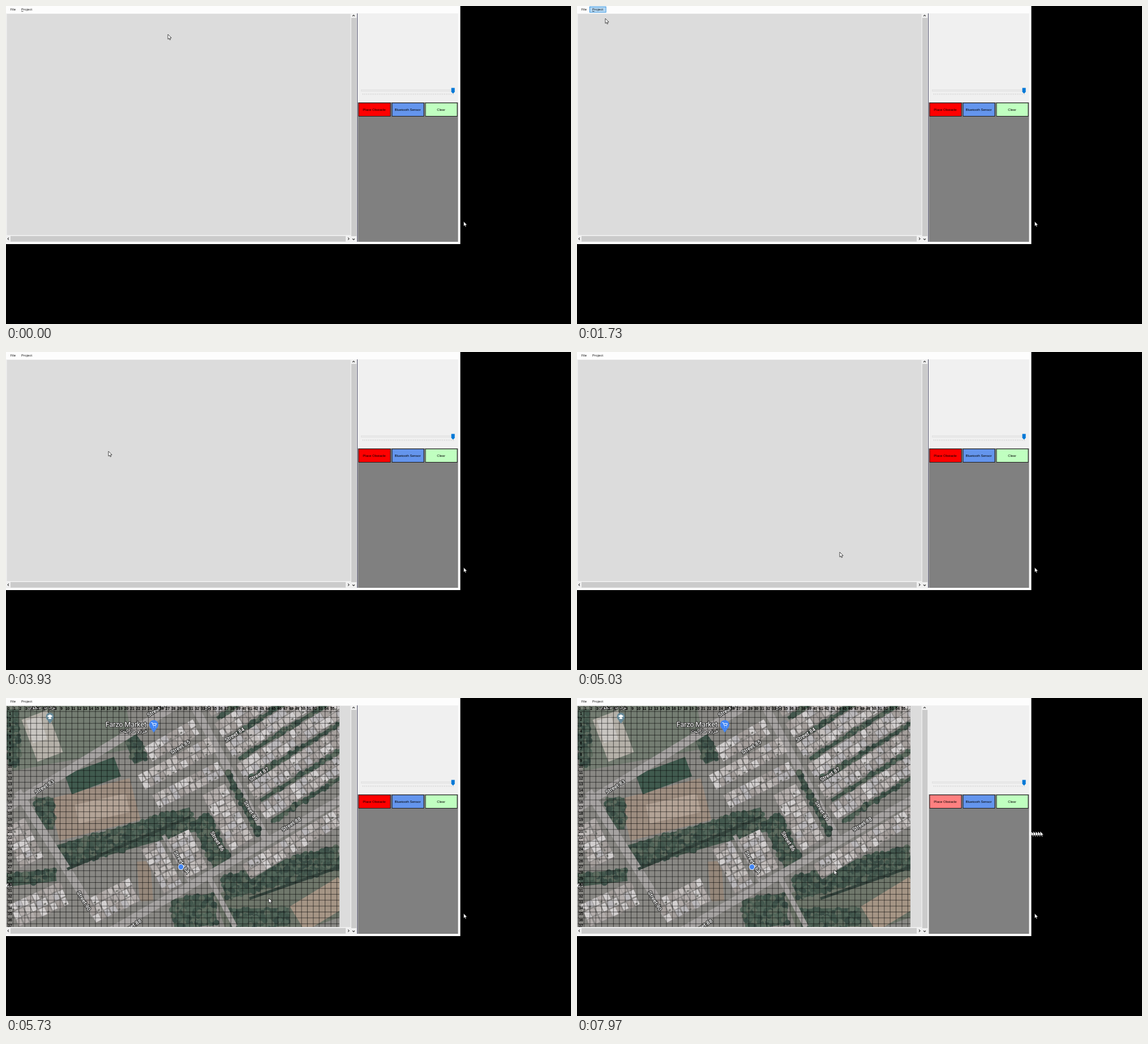
Recreate the animation shown at these times as an HTML page with a canvas. Size 998 by 561 pixels, loop 8000 ms.

```html
<!DOCTYPE html>
<html lang="en">
<head>
<meta charset="utf-8">
<title>Obstacle map editor</title>
<style>
html, body { margin: 0; width: 100%; height: 100%; overflow: hidden; background: #000; }
canvas { display: block; }
</style>
</head>
<body>
<canvas id="stage" width="998" height="561"></canvas>
<script>
const W = 998, H = 561, LOOP = 8000;
const MAP_AT = 5070, MENU_ON = 700, MENU_OFF = 2240, HOVER_AT = 6270, PRESS_AT = 7200;
const ctx = document.getElementById('stage').getContext('2d');
const UI = '6px "Open Sans", "Noto Sans", sans-serif';
const SANS = '"Liberation Sans", Arial, sans-serif';
const CELL = 10.4, LEFT = 2, TOP = 13.5;

// Pointer moves: start, end, target x, target y
const moves = [
  [30, 230, 134, 27], [430, 830, 43, 5], [1430, 1730, 50, 22],
  [2230, 2770, 227, 125], [2770, 3030, 197, 180], [3070, 3230, 168, 167],
  [3830, 4630, 464, 353], [5900, 6270, 640, 184], [6270, 6630, 802, 235],
  [6630, 6850, 818, 235], [6920, 7200, 648, 183], [7230, 7530, 584, 270],
  [7600, 7970, 454, 303]
];

function pointer(t) {
  let x = 286, y = 50;
  for (const [from, to, tx, ty] of moves) {
    const k = Math.min(1, Math.max(0, (t - from) / (to - from)));
    const e = k * k * (3 - 2 * k);
    x += (tx - x) * e;
    y += (ty - y) * e;
  }
  return [x, y];
}

function random(seed) {
  return () => (seed = (seed * 16807) % 2147483647) / 2147483647;
}

function rect(c, color, x, y, w, h) {
  c.fillStyle = color;
  c.fillRect(x, y, w, h);
}

function disc(c, color, x, y, r) {
  c.fillStyle = color;
  c.beginPath();
  c.arc(x, y, r, 0, 7);
  c.fill();
}

function text(c, str, x, y, font, align = 'left') {
  c.font = font;
  c.fillStyle = '#000';
  c.textAlign = align;
  c.textBaseline = 'middle';
  c.fillText(str, x, y);
}

function drawMap() {
  const layer = document.createElement('canvas');
  layer.width = 589;
  layer.height = 404;
  const m = layer.getContext('2d');
  const rnd = random(4127);
  const pick = list => list[Math.floor(rnd() * list.length)];
  m.beginPath();
  m.rect(1, 14, 588, 390);
  m.clip();

  // Everything on the ground is a straight band of some width
  const band = (color, width, x1, y1, x2, y2, fill) => {
    const len = Math.hypot(x2 - x1, y2 - y1);
    m.save();
    m.translate(x1, y1);
    m.rotate(Math.atan2(y2 - y1, x2 - x1));
    rect(m, color, 0, -width / 2, len, width);
    if (fill) fill(len, width);
    m.restore();
  };
  const houses = (...place) => band('#8d8a88', ...place, (len, width) => {
    const rows = Math.round(width / 15), depth = width / rows;
    for (let r = 0; r < rows; r++) {
      for (let u = 0; u < len - 5; u += 11) {
        const v = r * depth - width / 2;
        rect(m, pick(['#c4bfbd', '#b3adab', '#d2cfcf', '#a59f9c', '#bab8bb']), u, v, 8 + rnd() * 3, depth - 1 - rnd() * 2);
        if (rnd() < .35) rect(m, '#7a7a75', u + 1, v + depth * .6, 4, 3);
      }
    }
  });
  const trees = (...place) => band('#485b50', ...place, (len, width) => {
    for (let i = 0; i < len * width / 28; i++) {
      disc(m, pick(['#3b4e47', '#52665a', '#42574d', '#5f6d60']), rnd() * len, (rnd() - .5) * width, 2 + rnd() * 4);
    }
  });
  const road = (...place) => band('#a6a3a2', ...place);

  rect(m, '#898884', 0, 0, 589, 404);

  // Open ground
  band('#747d72', 120, 0, 70, 215, 30);
  band('#b5b1a9', 48, 50, 30, 78, 104);
  band('#c8c5c1', 26, 48, 36, 60, 76);
  band('#9d8d80', 76, 85, 215, 228, 178);
  band('#b3a396', 34, 125, 205, 215, 185);
  band('#6f776b', 110, 385, 400, 600, 325);
  band('#a59585', 52, 515, 390, 600, 338);
  band('#95877a', 24, 243, 288, 248, 358);

  // Greenery
  band('#405a4e', 36, 110, 153, 197, 121);
  trees(42, 95, 280, 330, 213);
  trees(34, 342, 212, 384, 296);
  trees(40, 385, 336, 589, 280);
  trees(32, 68, 176, 68, 232);
  trees(22, 0, 322, 88, 312);
  trees(76, 328, 350, 336, 404);
  trees(32, 395, 388, 500, 386);
  trees(20, 12, 20, 14, 120);
  trees(24, 214, 55, 238, 112);

  // Roads
  road(15, 0, 195, 320, 0);
  road(15, 20, 165, 160, 385);
  road(14, 180, 414, 600, 174);
  road(14, 332, 14, 462, 252);
  road(9, 355, 310, 405, 404);
  road(7, 278, 242, 326, 326);

  // Blocks of houses, north-east terraces first
  for (let i = -1; i < 5; i++) {
    const x = 376 + 19.2 * i, y = 58 + 36.3 * i;
    houses(30, x, y, x + 260, y - 163);
    trees(6, x + 16, y + 14, x + 276, y - 149);
  }
  houses(30, 252, 100, 335, 52);
  houses(30, 240, 150, 362, 84);
  houses(28, 265, 184, 378, 126);
  houses(46, 366, 162, 418, 262);
  houses(30, 425, 307, 600, 203);
  houses(38, 255, 260, 296, 340);
  houses(42, 304, 241, 338, 310);
  houses(46, 12, 222, 48, 295);
  houses(46, 150, 378, 228, 338);
  houses(44, 15, 385, 100, 346);
  trees(9, 390, 130, 446, 240);

  // Canal
  band('#36463f', 5, 108, 302, 325, 210);
  band('#36463f', 5, 430, 354, 589, 298);

  const label = (str, x, y, angle, font = '500 9.6px Roboto') => {
    m.save();
    m.translate(x, y);
    m.rotate(angle);
    m.font = `${font}, "Noto Sans", "DejaVu Sans", sans-serif`;
    m.textAlign = 'center';
    m.textBaseline = 'middle';
    m.lineJoin = 'round';
    m.lineWidth = 2.2;
    m.strokeStyle = '#30302f';
    m.strokeText(str, 0, 0);
    m.fillStyle = '#fff';
    m.fillText(str, 0, 0);
    m.restore();
  };
  const pin = (color, x, y, r) => {
    disc(m, color, x, y, r);
    m.beginPath();
    m.moveTo(x - r * .85, y + r * .5);
    m.lineTo(x + r * .85, y + r * .5);
    m.lineTo(x, y + r * 1.75);
    m.fill();
  };

  // Grid
  m.strokeStyle = 'rgba(0,0,0,.8)';
  m.lineWidth = .7;
  m.beginPath();
  for (let x = LEFT; x < 589; x += CELL) { m.moveTo(x, 14); m.lineTo(x, 404); }
  for (let y = TOP; y < 404; y += CELL) { m.moveTo(1, y); m.lineTo(589, y); }
  m.stroke();

  const along = -.56, across = 1.03;
  label('Street 83', 68, 157, along);
  label('Street 84', 404, 65, along);
  label('Street 85', 308, 87, along);
  label('Street 87', 447, 135, along);
  label('Street 88', 504, 223, along);
  label('Street 88', 222, 403, along);
  label('Street 85', 267, 21, along);
  label('Street 89', 432, 199, across);
  label('Street 86', 373, 253, across);
  label('Street 86A', 310, 290, across);
  label('Street 90', 137, 358, across);
  label('61', 6, 331, 0);
  label('St', 356, 18, 0);
  label('Farzo Market', 212, 47, 0, '400 12.4px Roboto');
  label('فرزو مارکیٹ', 225, 59, 0, '9px "DejaVu Sans"');
  label('بزم نو سکول', 68, 17, 0, '9px "DejaVu Sans"');

  pin('#4285f4', 261, 47, 8);
  m.strokeStyle = '#fff';
  m.lineWidth = 1;
  m.stroke(new Path2D('M256.5 43.5h2l1.5 5h4.5l1-3.5h-6M260 51h1M264 51h1'));
  pin('#668897', 77.5, 33, 7);
  m.fillStyle = '#fff';
  m.fill(new Path2D('M72.5 32l5-3l5 3l-5 3zM75 35h5v2h-5z'));

  disc(m, '#dce8fb', 309, 298, 5.2);
  disc(m, '#4285f4', 309, 298, 4.2);

  const num = `bold 6.6px ${SANS}`;
  for (let n = 0; n < 56; n++) text(m, n, 4.6 + CELL * n, 19, num, 'center');
  for (let n = 1; n < 38; n++) text(m, n, 7, 17.3 + CELL * n, num, 'center');
  return layer;
}

const arrow = new Path2D('M0 0V8.6L2 6.9L3.2 9.8L4.7 9.2L3.5 6.4L6.2 6.2Z');

function cursor(x, y) {
  ctx.save();
  ctx.translate(x, y);
  ctx.fillStyle = '#fff';
  ctx.fill(arrow);
  ctx.strokeStyle = '#111';
  ctx.lineWidth = .75;
  ctx.stroke(arrow);
  ctx.restore();
}

function chevron(x, y, dx, dy) {
  ctx.strokeStyle = '#404040';
  ctx.lineWidth = 1.1;
  ctx.beginPath();
  ctx.moveTo(x - dx - dy * 2, y - dy - dx * 2);
  ctx.lineTo(x + dx, y + dy);
  ctx.lineTo(x - dx + dy * 2, y - dy + dx * 2);
  ctx.stroke();
}

function button(label, i, color) {
  const x = 622.5 + 59 * i;
  rect(ctx, color, x, 171, 56.5, 23.5);
  ctx.strokeStyle = '#1c1c1c';
  ctx.lineWidth = 1;
  ctx.strokeRect(x + .5, 171, 56, 23.5);
  text(ctx, label, x + 28, 183.2, `6px ${SANS}`, 'center');
}

function slider() {
  rect(ctx, '#d9d9d9', 627, 147.5, 165, 3);
  rect(ctx, '#e9e9e9', 627.5, 148, 164, 2);
  for (let x = 630; x < 792; x += 3.2) rect(ctx, '#cacaca', x, 154.5, 1, 2);
  ctx.fillStyle = '#0078d7';
  ctx.fill(new Path2D('M786.6 144.5h6v7l-3 3l-3-3z'));
}

function drawWindow(t) {
  rect(ctx, '#fdfdfd', 0, 0, 802.5, 420);
  if (t >= MENU_ON && t < MENU_OFF) {
    rect(ctx, '#0078d7', 22, 1, 29.5, 10.5);
    rect(ctx, '#b3d7f3', 22.7, 1.7, 28.1, 9.1);
  }
  text(ctx, 'File', 7.7, 6.2, UI);
  text(ctx, 'Project', 27, 6.2, UI);
  if (t < MENU_OFF) rect(ctx, '#222', 27, 9.3, 3.6, .7);

  rect(ctx, '#f0f0f0', 0, 13, 620, 404);
  rect(ctx, '#dcdcdc', 1.5, 14, 607, 390);
  if (t >= MAP_AT) ctx.drawImage(map, 0, 0);

  rect(ctx, '#cbcbcb', 609.8, 21, 9.4, 385);
  rect(ctx, '#cbcbcb', 8, 405.8, 592, 9.8);
  chevron(614, 17, 0, -1);
  chevron(614, 411.5, 0, 1);
  chevron(4, 410.7, -1, 0);
  chevron(605, 410.7, 1, 0);

  rect(ctx, t < PRESS_AT ? '#53536c' : '#f0f0f0', 620, 13, 1.2, 403);
  rect(ctx, '#f0f0f0', 621.2, 13, 177.5, 157);
  rect(ctx, '#808080', 621.5, 170, 177, 246);
  slider();
  button('Place Obstacle', 0, t < HOVER_AT ? '#ff0000' : t < PRESS_AT ? '#e60000' : '#ff8080');
  button('Bluetooth Sensor', 1, '#6495ed');
  button('Clear', 2, '#c0ffc0');
}

// Ghost pointers stay on the screen beyond the window edge
function trail(t) {
  ctx.save();
  ctx.beginPath();
  ctx.rect(802.5, 0, W, H);
  ctx.clip();
  for (let i = 0; i < 5; i++) {
    if (t >= 6630 + i * 55) cursor(802 + i * 4, 235);
  }
  ctx.restore();
}

function draw(t) {
  rect(ctx, '#000', 0, 0, W, H);
  drawWindow(t);
  cursor(808.3, 380);
  trail(t);
  cursor(...pointer(t));
}

const map = drawMap();
const start = performance.now();

function tick() {
  draw((performance.now() - start) % LOOP);
  requestAnimationFrame(tick);
}
tick();
</script>
</body>
</html>
```
